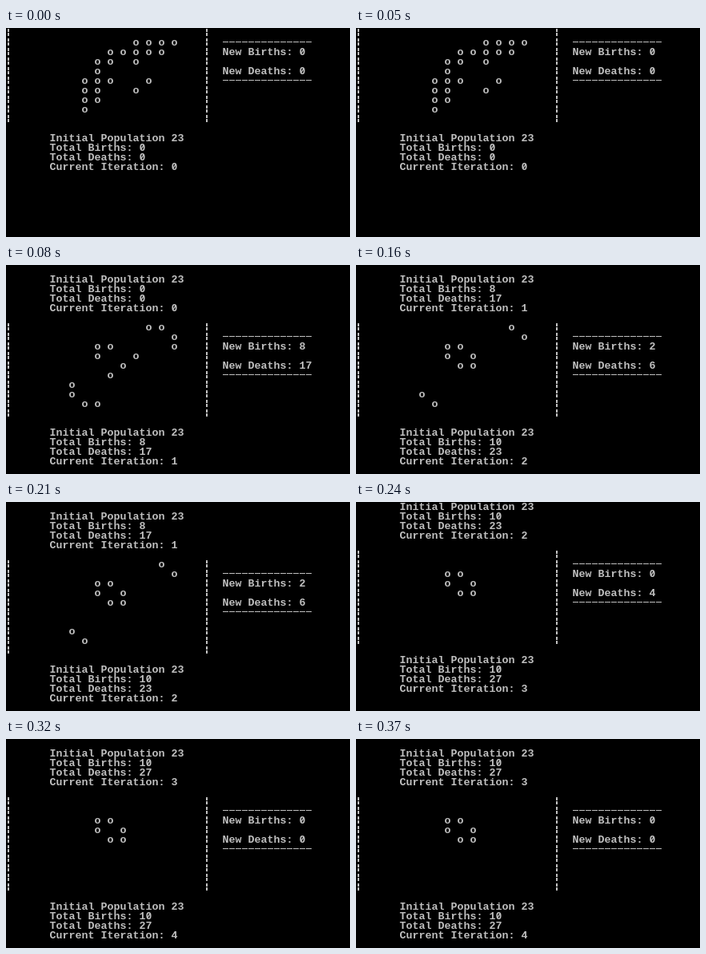
Recreate the animation shown at these times as an HTML page with a canvas. Size 430 by 262 pixels, loop 0.4 s.

```html
<!DOCTYPE html>
<html lang="en">
<head>
<meta charset="utf-8">
<title>Game of Life console</title>
<style>
  html, body { margin: 0; width: 100%; height: 100%; overflow: hidden; background: #000; }
  canvas { display: block; }
</style>
</head>
<body>
<canvas id="screen" width="430" height="262"></canvas>
<script>
const ctx = document.getElementById('screen').getContext('2d');
const CELL_W = 8, CELL_H = 12, LEFT = -1;
const GLYPH_CENTER = 3.5, BASELINE = 10;
const TEXT_FONT = 'bold 13.33px "Liberation Mono", monospace';
const SLASHED_ZERO_FONT = 'bold 12.4px "Noto Sans Mono", monospace';
const ROWS = 10, COLS = 16;
const STEP_MS = 80;
const BOARD_LINES = [0, 6, 6, 5, 6]; // console line where each board begins

const seed = [
  '',
  '          oooo',
  '        ooooo',
  '       oo o',
  '       o',
  '      ooo  o',
  '      oo  o',
  '      oo',
  '      o',
  ''
];

const alive = (board, r, c) => board[r]?.[c] ? 1 : 0;

function neighbours(board, r, c) {
  let count = -alive(board, r, c);
  for (let y = r - 1; y <= r + 1; y++)
    for (let x = c - 1; x <= c + 1; x++) count += alive(board, y, x);
  return count;
}

function nextGeneration({ board, births, deaths }) {
  let born = 0, died = 0;
  const next = board.map((row, r) => row.map((cell, c) => {
    const n = neighbours(board, r, c);
    const lives = n === 3 || (cell && n === 2);
    if (lives && !cell) born++;
    if (!lives && cell) died++;
    return lives;
  }));
  return { board: next, born, died, births: births + born, deaths: deaths + died };
}

const firstBoard = seed.map(row => Array.from({ length: COLS }, (_, c) => row[c] === 'o'));
const population = firstBoard.flat().filter(Boolean).length;
const generations = [{ board: firstBoard, born: 0, died: 0, births: 0, deaths: 0 }];
while (generations.length < BOARD_LINES.length)
  generations.push(nextGeneration(generations.at(-1)));

const colX = col => LEFT + col * CELL_W;

// Console text: every character is centred in its own cell.
function print(text, col, line) {
  [...text].forEach((char, i) => {
    ctx.font = char === '0' ? SLASHED_ZERO_FONT : TEXT_FONT;
    ctx.fillText(char, colX(col + i) + GLYPH_CENTER, line * CELL_H + BASELINE);
  });
}

function bar(col, line) {
  const x = colX(col) + 3, y = line * CELL_H;
  ctx.fillRect(x, y + 1, 2, 4);
  ctx.fillRect(x, y + 6, 2, 4);
}

function rule(col, line) {
  for (let i = 0; i < 14; i++)
    ctx.fillRect(colX(col + i), line * CELL_H + 5, 7, 1);
}

function drawTotals(index, line) {
  const { births, deaths } = generations[index];
  [
    `Initial Population ${population}`,
    `Total Births: ${births}`,
    `Total Deaths: ${deaths}`,
    `Current Iteration: ${index}`
  ].forEach((text, i) => print(text, 7, line + i));
}

function drawBoard({ board, born, died }, line) {
  for (let r = 0; r < ROWS; r++) {
    bar(0, line + r);
    bar(31, line + r);
    board[r].forEach((cell, c) => { if (cell) print('o', c * 2, line + r); });
  }
  rule(34, line + 1);
  print(`New Births: ${born}`, 34, line + 2);
  print(`New Deaths: ${died}`, 34, line + 4);
  rule(34, line + 5);
}

function draw(now) {
  const index = Math.floor(now / STEP_MS) % generations.length;
  const line = BOARD_LINES[index];
  ctx.fillStyle = '#000';
  ctx.fillRect(0, 0, 430, 262);
  ctx.fillStyle = '#c0c0c0';
  ctx.textAlign = 'center';
  if (index > 0) drawTotals(index - 1, line - 5);
  drawBoard(generations[index], line);
  drawTotals(index, line + ROWS + 1);
}

const start = performance.now();
function tick() {
  draw(performance.now() - start);
  requestAnimationFrame(tick);
}
tick();
</script>
</body>
</html>
```
